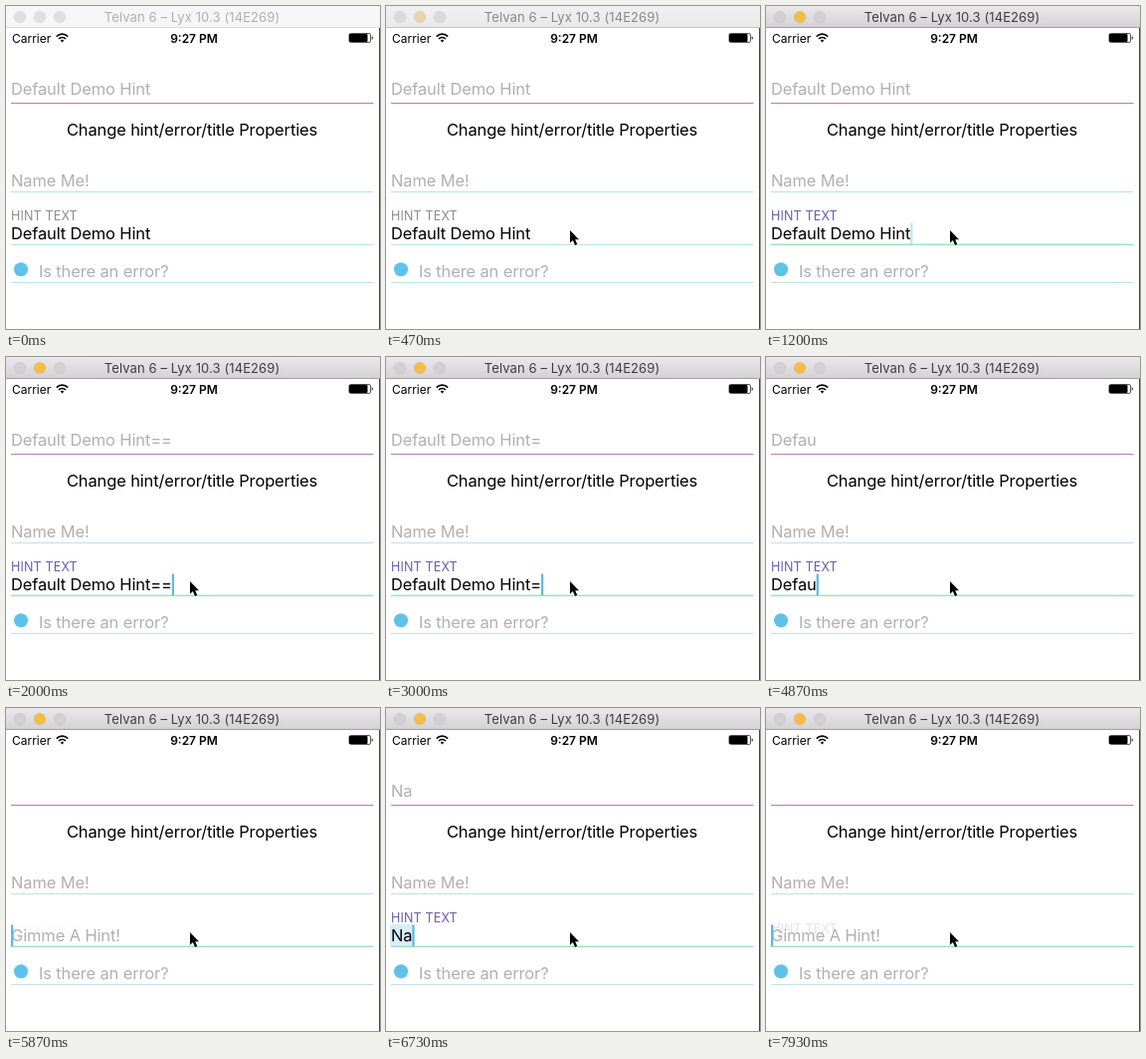
Animation, 376 px wide and 324 px high, one loop 8000 ms. Source, as an HTML page:

```html
<!DOCTYPE html>
<html lang="en">
<head>
<meta charset="utf-8">
<title>Text field hints</title>
<style>
  html, body { margin: 0; width: 100%; height: 100%; overflow: hidden; background: #fff; }
  svg { display: block; width: 376px; height: 324px; }
  text { font: 16.5px Inter, Roboto, sans-serif; letter-spacing: -.14px; white-space: pre; fill: #000; }
  .hint { fill: #b0b0b0; }
  #title { font-size: 13px; letter-spacing: .1px; }
  .status { font-size: 12px; letter-spacing: 0; }
  .bold { font-weight: 600; }
  #label { font-size: 12.5px; letter-spacing: .17px; }
</style>
</head>
<body>
<svg viewBox="0 0 376 324">
  <defs>
    <linearGradient id="chrome" x2="0" y2="1">
      <stop stop-color="#eae8ea"/><stop offset="1" stop-color="#d3d1d3"/>
    </linearGradient>
  </defs>
  <rect width="376" height="324" fill="#fff"/>

  <rect width="376" height="22" fill="#f6f6f6"/>
  <g id="active">
    <rect width="376" height="22" fill="url(#chrome)"/>
    <rect y="21" width="376" height="1" fill="#b4b2b4"/>
  </g>
  <rect y="21" width="376" height="1" fill="#000" opacity=".1"/>
  <g stroke="#000" stroke-opacity=".06">
    <circle class="lamp" cx="14" cy="11" r="5.8"/>
    <circle id="amber" cx="34" cy="11" r="5.8"/>
    <circle class="lamp" cx="54" cy="11" r="5.8"/>
  </g>
  <text id="title" x="187" y="16" text-anchor="middle">Telvan 6 – Lyx 10.3 (14E269)</text>

  <text class="status" x="6" y="36.5">Carrier</text>
  <g fill="none" stroke="#000" stroke-width="1.7">
    <path d="M50.8 30.6a8 8 0 0 1 11.4 0M53 33a5 5 0 0 1 7 0"/>
    <path d="M56.5 36.5l-1.7-1.8a2.4 2.4 0 0 1 3.4 0z" fill="#000" stroke="none"/>
  </g>
  <text class="status bold" x="189" y="36.5" text-anchor="middle">9:27 PM</text>
  <rect x="345" y="27.5" width="21.5" height="9" rx="1.6" fill="none" stroke="#555"/>
  <rect x="345" y="28" width="18.5" height="8" rx="1"/>
  <path d="M367.6 30.2q1.6 .4 1.6 1.8t-1.6 1.8z" fill="#555"/>

  <text id="mirror" class="hint" x="5" y="89"></text>
  <rect x="5" y="97" width="364.5" height="1" fill="#b57db6"/>
  <text x="187" y="130" text-anchor="middle">Change hint/error/title Properties</text>
  <text class="hint" x="5" y="181">Name Me!</text>
  <rect x="5" y="186" width="364.5" height="1" fill="#bce2e8"/>

  <rect id="mark" x="4" y="217" height="22" fill="#d8edfa"/>
  <text id="label" x="5" y="214.5">HINT TEXT</text>
  <text id="ghost" class="hint" x="5" y="234">Gimme A Hint!</text>
  <text id="value" x="5" y="234"></text>
  <rect id="line" x="5" width="364.5"/>
  <rect id="caret" y="217.5" width="2.2" height="21.5" fill="#5fb8e0"/>

  <circle cx="15" cy="264.3" r="7" fill="#5fc2ea"/>
  <text class="hint" x="33" y="272">Is there an error?</text>
  <rect x="5" y="277" width="364.5" height="1" fill="#bce2e8"/>
  <rect x="375" y="22" width="1" height="302" fill="#444"/>

  <path id="mouse" d="M0 0v12.8l2.9-2.7 2.1 4.8 2.3-1-2.1-4.7h3.8z" stroke="#fff" paint-order="stroke"/>
</svg>
<script>
const LOOP = 8000, FULL = "Default Demo Hint";
const el = id => document.getElementById(id);
const ui = Object.fromEntries(
  ["active", "amber", "title", "mirror", "mark", "label", "ghost", "value", "line", "caret", "mouse"]
    .map(id => [id, el(id)]));
const lamps = document.querySelectorAll(".lamp");

// [time, text] for every keystroke
const typed = [[0, FULL], [1800, FULL + "="], [2000, FULL + "=="], [2800, FULL + "="], [3130, FULL]];
[3200, 3400, 3530, 3730, 4000, 4130, 4270, 4330, 4470, 4530, 4670, 4870, 5000, 5130, 5200, 5330, 5470]
  .forEach((t, i) => typed.push([t, FULL.slice(0, 16 - i)]));
typed.push([6200, "N"], [6530, "Na"], [7600, ""]);

// [time, value] tracks, linear between points
const caretTrack = [[670, 0], [730, 1], [1000, 1], [1330, 0], [1530, 0], [1730, 1], [2270, 1], [2530, 0],
  [2799, 0], [2800, 1], [7000, 1], [7270, 0], [7530, 0], [7600, 1]];
const labelTrack = [[5470, 1], [5870, .04], [6000, 0], [6200, 0], [6600, 1], [7600, 1], [8000, 0]];
const focusTrack = [[640, 0], [730, 1]];
const activeTrack = [[440, 0], [530, 1]];
const mouseX = [[70, 366], [330, 205], [470, 185]];
const mouseY = [[70, 291], [330, 232], [470, 225]];

function at(track, t) {
  const i = track.findIndex(p => p[0] > t);
  if (i === 0) return track[0][1];
  if (i < 0) return track[track.length - 1][1];
  const [t0, a] = track[i - 1], [t1, b] = track[i];
  return a + (b - a) * (t - t0) / (t1 - t0);
}

const set = (node, attrs) => {
  for (const k in attrs) node.setAttribute(k, attrs[k]);
};
const mix = (a, b, p) =>
  `rgb(${a.map((v, i) => Math.round(v + (b[i] - v) * p)).join(",")})`;

function draw(t) {
  const text = typed.filter(k => k[0] <= t).pop()[1];
  const active = at(activeTrack, t), focus = at(focusTrack, t), shown = at(labelTrack, t);

  set(ui.active, { opacity: active });
  ui.title.style.fill = mix([176, 176, 176], [62, 62, 62], active);
  const idle = [224, 224, 224];
  set(ui.amber, { fill: mix(idle, [246, 188, 70], active) });
  lamps.forEach(lamp => set(lamp, { fill: mix(idle, [210, 208, 210], active) }));

  ui.value.textContent = text;
  ui.mirror.textContent = text;
  set(ui.ghost, { opacity: text ? 0 : 1 });
  const width = text ? ui.value.getComputedTextLength() : 0;
  set(ui.caret, { x: 5 + width, opacity: at(caretTrack, t) });
  set(ui.mark, { width: width + 2, opacity: t >= 6670 && t < 7600 ? 1 : 0 });

  ui.label.style.fill = mix([140, 140, 140], [108, 92, 178], focus);
  set(ui.label, { opacity: shown, transform: `translate(0 ${14 * (1 - shown)})` });
  set(ui.line, {
    y: 239 - .4 * focus, height: 1 + .5 * focus,
    fill: mix([188, 226, 232], [150, 231, 180], focus)
  });

  set(ui.mouse, {
    transform: `translate(${at(mouseX, t)} ${at(mouseY, t)})`,
    opacity: t < 70 ? 0 : 1
  });
}

const start = performance.now();
function tick(now) {
  draw(Math.max(0, now - start) % LOOP);
  requestAnimationFrame(tick);
}
draw(0);
requestAnimationFrame(tick);
</script>
</body>
</html>
```
